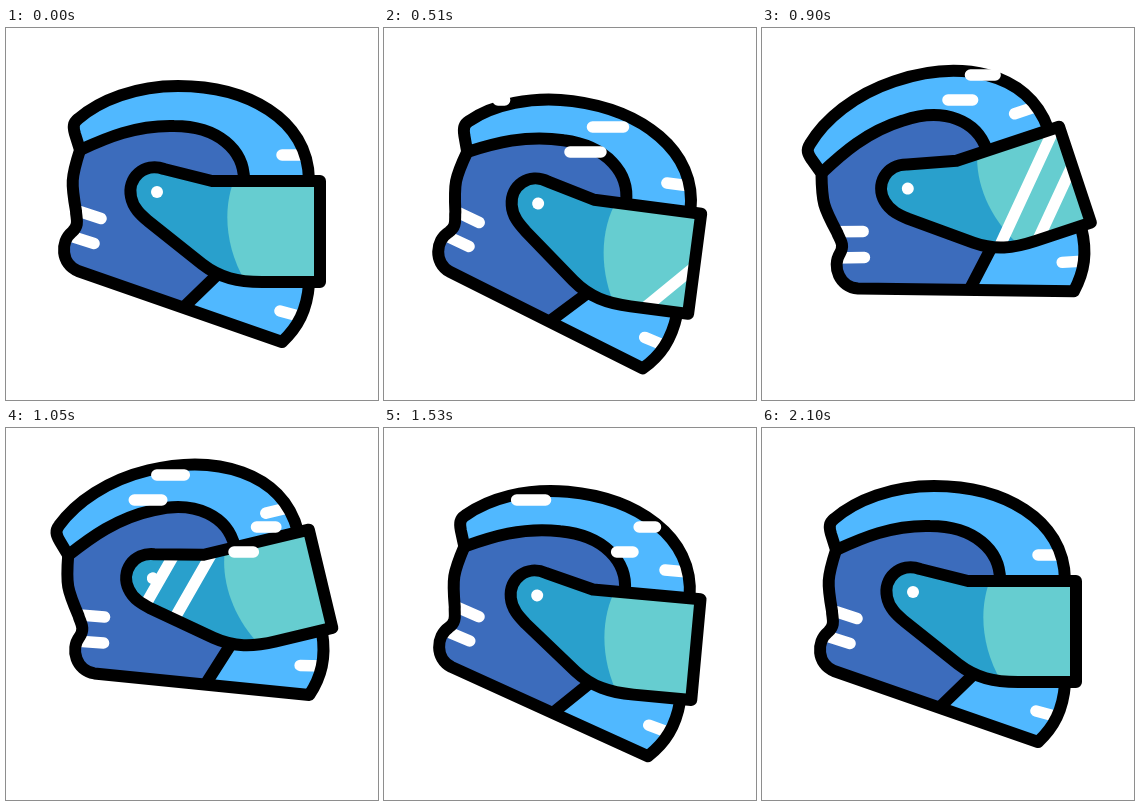
An HTML page that plays this animation: 372 px wide and 372 px high, repeating every 2250 ms.

```html
<!DOCTYPE html>
<html lang="en">
<head>
<meta charset="utf-8">
<title>Helmet</title>
<style>
html, body { margin: 0; width: 100%; height: 100%; overflow: hidden; background: #fff; }
svg { display: block; width: 100%; height: 100%; fill: none; stroke-linecap: round; stroke-linejoin: round; }
.line { stroke: #000; stroke-width: 12; }
.white { stroke: #fff; stroke-width: 11.5; }
</style>
</head>
<body>
<svg viewBox="0 0 372 372">
  <defs>
    <path id="shell" d="M72 91C94 72 130 58 172 58C240 58 302 90 303 152V256C301 282 292 299 276 314L72 243C55 236 54 214 66 204C74 197 70 190 70 183C65 155 65 150 74 122L69 106C67 99 67 95 72 91Z"/>
    <path id="visor" d="M314 153H206L158 141C138 134 121 150 125 169C127 180 135 187 142 193L196 236C214 250 232 254 256 254H314Z"/>
    <clipPath id="inShell"><use href="#shell"/></clipPath>
    <clipPath id="inVisor"><use href="#visor"/></clipPath>
  </defs>
  <g id="helmet">
    <g clip-path="url(#inShell)">
      <use href="#shell" fill="#50b8ff"/>
      <path fill="#3c6cbc" d="M0 122H74C100 110 130 97 168 98C212 98 238 122 238 152L212 246L180 277L160 330H0Z"/>
      <path class="white" d="M276 127H304M274 283L300 290M66 181L95 190.5M58 206L88 215.5"/>
    </g>
    <path class="line" d="M74 122C100 110 130 97 168 98C212 98 238 122 238 152M212 246L180 277"/>
    <use href="#shell" class="line"/>
    <g id="shield">
      <g clip-path="url(#inVisor)">
        <use href="#visor" fill="#29a0cc"/>
        <path fill="#66cdd0" d="M229 150C216 180 219 222 242 258H320V150Z"/>
        <path id="gleam" class="white" d="M-94 300L94 100M-50 300L138 100"/>
      </g>
      <use href="#visor" class="line"/>
      <circle cx="151" cy="164" r="6" fill="#fff"/>
    </g>
  </g>
  <path id="wind" class="white"/>
</svg>
<script>
const LOOP = 2250, STEP = 30, LAST = 2100;
const el = id => document.getElementById(id);
const turn = (id, value) => el(id).setAttribute("transform", value);

// Turning points [time, value], eased between
const tilt = [[0, 0], [440, 9.5], [860, -18.5], [930, -18.5], [1350, 7], [1900, 0], [LAST, 0]];
const lift = [[0, 0], [490, 16], [1050, -22.5], [1630, 9], [LAST, 0]];

const smooth = x => { x = Math.min(1, Math.max(0, x)); return x * x * (3 - 2 * x); };
const bump = (t, centre, half) => smooth(1 - Math.abs(t - centre) / half);

const ease = (keys, t) => keys.slice(1).reduce((sum, [t1, v1], i) => {
  const [t0, v0] = keys[i];
  return sum + (v1 - v0) * smooth((t - t0) / (t1 - t0));
}, keys[0][1]);

// The shield lags behind the shell on fast turns
const swing = t => 2.6 * bump(t, 770, 150) + 1.4 * bump(t, 1290, 200);

// The shine slows in the front of the visor, then sweeps left
const shine = t => 299 - 3.7e-6 * (t - 690) ** 3;

// Each gust is an upper pair of streaks, then a lower pair
function windPath(t) {
  const reach = 105, span = 380, lag = .2;
  let path = "";
  for (const start of [112, 758, 1252]) for (const pair of [0, 1]) {
    const x = (t - start - 180 * pair) / span;
    const head = reach * smooth(x), tail = reach * smooth(x - lag);
    if (head - tail < 1.5) continue;
    for (const row of [0, 1]) {
      const right = 241.5 + 31 * pair - 22.5 * row, y = 47 + 52 * pair + 25 * row;
      path += `M${right - tail} ${y}H${right - head}`;
    }
  }
  return path;
}

function draw() {
  const now = performance.now() % LOOP;
  const t = Math.min(LAST, Math.floor(now / STEP) * STEP);
  turn("helmet", `translate(0 ${ease(lift, t)}) rotate(${ease(tilt, t)} 186 186)`);
  turn("shield", `rotate(${swing(t)} 151 164)`);
  turn("gleam", `translate(${shine(t)})`);
  el("wind").setAttribute("d", windPath(t));
  requestAnimationFrame(draw);
}
draw();
</script>
</body>
</html>
```
